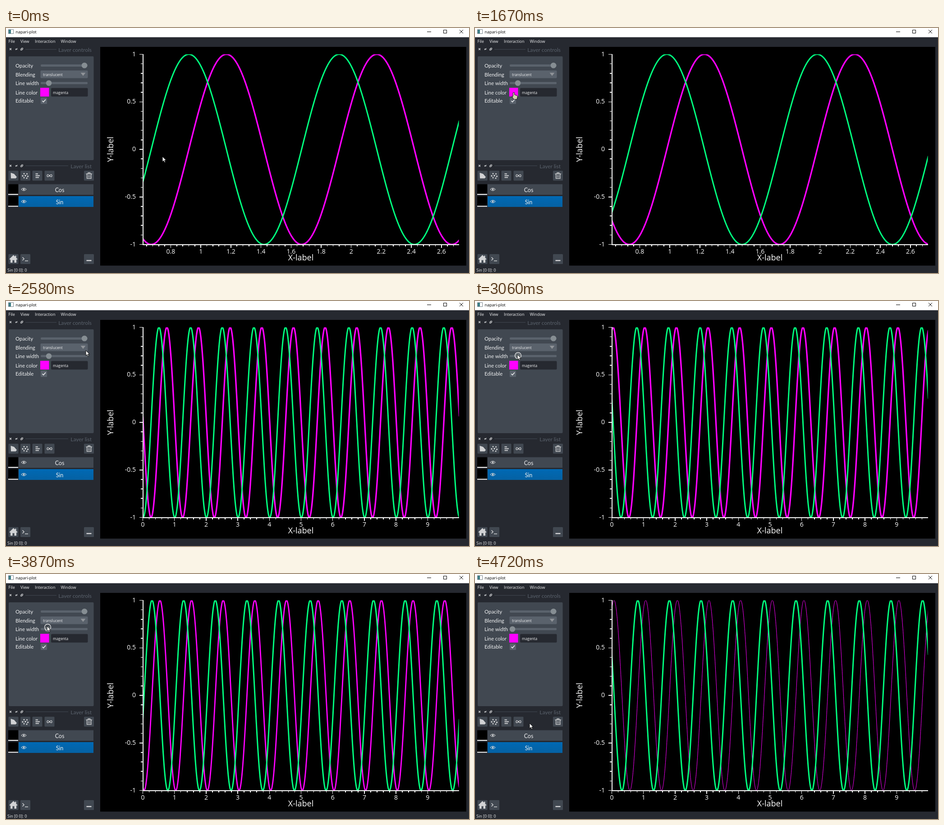
An HTML page that plays this animation: 1027x545 px, repeating every 4.82 s.

```html
<!DOCTYPE html>
<html lang="en">
<head>
<meta charset="utf-8">
<title>napari-plot</title>
<style>
  html, body { margin: 0; width: 100%; height: 100%; overflow: hidden; background: #262930; }
  svg { display: block; width: 1027px; height: 545px; font-family: "Open Sans", sans-serif; }
  .ui { font-size: 9px; fill: #f0f1f2; }
  .field { font-size: 8.3px; fill: #f0f1f2; }
  .label { font: 11.4px Lato, sans-serif; fill: #f0f1f2; }
  .layer { font: 12.5px Lato, sans-serif; fill: #f0f1f2; text-anchor: middle; }
  .dock { font: 12px Lato, sans-serif; fill: #5a626c; text-anchor: end; }
  .tick { font-size: 14px; fill: #fff; }
  .axis { font-size: 18px; fill: #fff; text-anchor: middle; }
  .panel { fill: #414851; }
  .groove { fill: #5a626c; }
  .knob { fill: #868e93; }
  .icon { fill: none; stroke: #d1d2d4; stroke-width: 1.3; }
  .solid { fill: #d1d2d4; }
  .line { fill: none; stroke-linejoin: round; }
  .ticks { stroke: #fff; shape-rendering: crispEdges; fill: none; }
</style>
</head>
<body>
<svg viewBox="0 0 1027 545">
  <defs>
    <clipPath id="plotClip"><rect x="304" y="58.5" width="700.5" height="423"/></clipPath>
    <clipPath id="titleClip"><rect x="100" y="38" width="95" height="15.4"/></clipPath>
    <g id="dockButtons">
      <path d="M8 -2L12 2M12 -2L8 2" stroke="#d1d2d4" stroke-width="1.2"/>
      <ellipse cx="23" rx="2.6" ry="1.5" fill="#9a9da1"/>
      <path d="M21 2L25.5 -2" stroke="#d1d2d4"/>
      <path d="M34.5 -2.5H37.5V.5H34.5ZM32.5 -.5H35.5V2.5H32.5Z" fill="none" stroke="#d1d2d4"/>
    </g>
    <rect id="button" class="panel" width="22" height="22" rx="1.5"/>
    <g id="eye">
      <path d="M-5.5 0Q0 -6 5.5 0Q0 6 -5.5 0Z" fill="none" stroke="#d1d2d4" stroke-width="1.1"/>
      <circle r="1.9" class="solid"/>
    </g>
    <g id="thumb">
      <rect x="5" width="22" height="23"/>
      <rect x="5" y="21.5" width="22" height="2" fill="#fff"/>
    </g>
    <linearGradient id="selected" x2="0" y2="1">
      <stop stop-color="#0069b4"/><stop offset="1" stop-color="#0561a3"/>
    </linearGradient>
  </defs>

  <rect width="1027" height="545" fill="#262930"/>
  <rect width="1027" height="20.5" fill="#fff"/>
  <rect x="5.5" y="3.5" width="11" height="9" fill="#fff" stroke="#78848c"/>
  <rect x="6" y="4" width="5" height="8" fill="#3e8087"/>
  <text x="21.5" y="11.5" class="ui" style="fill:#000">napari-plot</text>
  <path d="M934 8.5H943M970.5 4.5H977.5V11.5H970.5ZM1006 4L1014 12M1014 4L1006 12" fill="none" stroke="#000"/>
  <g class="ui">
    <text x="5.5" y="33">File</text><text x="32" y="33">View</text>
    <text x="64" y="33">Interaction</text><text x="121.5" y="33">Window</text>
    <text x="3" y="542">Sin [0 0]: 0</text>
  </g>

  <use href="#dockButtons" y="47"/>
  <path d="M43 47.5H112M43 306.5H138" stroke="#414851"/>
  <g clip-path="url(#titleClip)"><text x="190" y="52.5" class="dock">Layer controls</text></g>
  <rect class="panel" x="6" y="63" width="188.5" height="231" rx="2"/>
  <g class="label">
    <text x="21" y="88">Opacity</text><text x="21" y="107.5">Blending</text>
    <text x="21" y="127">Line width</text><text x="21" y="147.5">Line color</text>
    <text x="21" y="166">Editable</text>
  </g>
  <g class="groove">
    <rect x="77" y="81" width="104" height="5" rx="2"/>
    <rect x="76.500" y="94.500" width="105" height="17" rx="2"/>
    <rect x="77" y="120" width="104" height="5" rx="2"/>
    <rect x="77" y="155" width="14" height="14" rx="1.500"/>
  </g>
  <circle class="knob" cx="174" cy="83.300" r="6.300"/>
  <circle class="knob" id="knob" cx="95" cy="122.500" r="6.300"/>
  <path d="M165.500 99.500H176.500L171 106.500Z" fill="#909499"/>
  <text x="82" y="106.500" class="field">translucent</text>
  <rect x="76" y="133" width="19.500" height="19.500" fill="#f0f"/>
  <rect x="100" y="133.500" width="81.500" height="19" rx="2" fill="#262930"/>
  <text x="104" y="146.500" class="field">magenta</text>
  <path d="M80.500 162L83 164.500L88 159" fill="none" stroke="#f0f1f2" stroke-width="1.600"/>

  <use href="#dockButtons" y="306.500"/>
  <g clip-path="url(#titleClip)" transform="translate(0 259.500)"><text x="190" y="52.500" class="dock">Layer list</text></g>
  <use href="#button" x="5.500" y="317.500"/><use href="#button" x="32" y="317.500"/>
  <use href="#button" x="58.500" y="317.500"/><use href="#button" x="85.500" y="317.500"/>
  <use href="#button" x="173" y="317.500"/>
  <path class="solid" d="M10.500 322L18 324.500L24 331.500L21.500 334.500H11Z"/>
  <g class="solid">
    <circle cx="37" cy="329" r="1.700"/><circle cx="40" cy="324" r="1.600"/>
    <circle cx="43" cy="328.500" r="1.800"/><circle cx="46.500" cy="324.500" r="1.600"/>
    <circle cx="48.500" cy="330" r="1.700"/><circle cx="40" cy="333" r="1.600"/>
    <circle cx="46" cy="334" r="1.600"/>
  </g>
  <path class="icon" style="stroke-width:1.800" d="M65.500 324.500H71M65.500 328.500H75M65.500 332.500H73"/>
  <path class="icon" d="M96.500 328.500C93 324.500 91 326 91 328.500S93 332.500 96.500 328.500S102 326 102 328.500S100 332.500 96.500 328.500Z"/>
  <path class="icon" d="M177.500 324.500H191M182 324V322H186.500V324M179.500 325V334.500H189V325M182.500 327V332.500M186 327V332.500"/>

  <use href="#thumb" y="347.500"/>
  <rect class="panel" x="28" y="347.500" width="166" height="23.500"/>
  <use href="#eye" x="39.500" y="359"/><text x="119" y="364.500" class="layer">Cos</text>
  <use href="#thumb" y="374"/>
  <rect x="28" y="374" width="166" height="24" fill="url(#selected)"/>
  <use href="#eye" x="39.500" y="386"/><text x="119" y="391.500" class="layer">Sin</text>

  <use href="#button" x="5.500" y="503"/><use href="#button" x="32" y="503"/><use href="#button" x="173" y="503"/>
  <path class="solid" d="M7.500 514L16.500 505L20 508.500V506.500H22.500V511L25.500 514L24 515.500L23 514.500V522H18.500V516.500H14.500V522H10V514.500L9 515.500Z"/>
  <path class="icon" style="stroke-width:1.600" d="M36.500 510L40 513.500L36.500 517M42 518H49"/>
  <rect class="solid" x="178.500" y="516" width="11" height="2.500"/>

  <rect x="209" y="42" width="812" height="486.500"/>
  <g clip-path="url(#plotClip)">
    <path id="sin" class="line" stroke="#f0f"/>
    <path id="cos" class="line" stroke="#00ff7f" stroke-width="3"/>
  </g>
  <path class="ticks" d="M303.500 57.500V482.500M302.500 481.500H1005" stroke-width="2"/>
  <g id="yAxis"></g>
  <g id="xAxis"></g>
  <text x="654" y="517" class="axis">X-label</text>
  <text transform="translate(238 270) rotate(-90)" class="axis">Y-label</text>

  <circle id="ring" r="7" fill="#41485166" stroke="#e4e4e4" stroke-width="1.400"/>
  <g id="pointer" stroke="#000" stroke-width=".9">
    <path id="arrow" fill="#f4f4f4" d="M0 0V11.500L2.700 9L4.700 13.300L6.600 12.400L4.700 8.200H8.300Z"/>
    <path id="hand" fill="#cfcfae" d="M-1.700 1Q0 -1 1.700 1V5.500L7 7Q8.700 8 8.200 11L7 15.800H0L-3.600 10Q-4.500 7.500 -1.700 9Z"/>
  </g>
</svg>
<script>
const LOOP = 4820;
// moments at which the picture is refreshed
const TICKS = [0, 100, 215, 330, 445, 560, 680, 790, 900, 1000, 1110, 1210, 1320, 1430, 1550, 1670,
  1790, 1910, 2030, 2140, 2250, 2360, 2470, 2580, 2700, 2820, 2940, 3060, 3180, 3310, 3430,
  3550, 3660, 3770, 3870, 4000, 4110, 4230, 4350, 4480, 4600, 4720];

// tracks: [time, value...]
const PHASE = [[0, .92], [900, 1.48], [1670, 1.98], [2580, 2.51], [3430, 3.01], [3870, 3.29], [4720, 3.82]];
const KNOB = [[3060, 95], [3430, 109.5], [3550, 108], [3870, 92.5], [4000, 87], [4110, 83]];
const POINTER = [[0, 347, 286], [445, 420, 288], [900, 505, 293], [1000, 370, 245], [1110, 187, 185],
  [1210, 100, 155], [1320, 80, 145], [1670, 86, 143], [1790, 105, 150], [2030, 400, 235],
  [2140, 400, 235], [2360, 240, 140], [2580, 177, 110], [2820, 115, 117], [2940, 94, 119],
  [3060, 94, 119], [3430, 108, 118], [3550, 107, 118], [3870, 91, 116], [4000, 85, 117],
  [4110, 82, 118], [4350, 82, 119], [4600, 103, 250], [4720, 121, 332]];

const ZOOMED = { left: .6141, scale: 333.5, minor: .04 };
const FULL = { left: 0, scale: 70.2, minor: .2 };
const X0 = 303.5, X1 = 1004.5, Y0 = 270, AMP = 211.5;
const $ = id => document.getElementById(id);

function sample(track, t) {
  const next = track.findIndex(key => key[0] > t);
  if (next === 0) return track[0].slice(1);
  if (next < 0) return track[track.length - 1].slice(1);
  const a = track[next - 1], b = track[next], k = (t - a[0]) / (b[0] - a[0]);
  return a.slice(1).map((v, i) => v + (b[i + 1] - v) * k);
}

function curve(view, wave, phase) {
  let d = '';
  for (let x = X0; x <= X1 + 1; x += .5) {
    const value = wave(2 * Math.PI * (view.left + (x - X0) / view.scale - phase));
    d += (d ? 'L' : 'M') + x + ' ' + (Y0 - AMP * value).toFixed(2);
  }
  return d;
}

function axis(mark) {
  return `<path class="ticks" stroke-width="1.5" d="${mark.ticks}"/>${mark.labels}`;
}

function yAxis() {
  const mark = { ticks: '', labels: '' };
  for (let i = -10; i <= 10; i++) {
    const y = Y0 - i / 10 * AMP, major = i % 5 === 0;
    mark.ticks += `M${major ? 295.5 : 299} ${y}H303`;
    if (major) mark.labels += `<text class="tick" x="288" y="${y + 4}" text-anchor="end">${i / 10}</text>`;
  }
  return axis(mark);
}

function xAxis({ left, scale, minor }) {
  const mark = { ticks: '', labels: '' };
  const last = Math.floor((left + (X1 - X0) / scale) / minor);
  for (let i = Math.ceil(left / minor); i <= last; i++) {
    const x = X0 + (i * minor - left) * scale, major = i % 5 === 0;
    mark.ticks += `M${x} 482V${major ? 489 : 486}`;
    if (major) mark.labels += `<text class="tick" x="${x}" y="501.5" text-anchor="middle">${+(i * minor).toFixed(1)}</text>`;
  }
  return axis(mark);
}

const show = (el, on) => el.setAttribute('visibility', on ? 'visible' : 'hidden');
let shownView, shownTick;

function draw(t) {
  if (t === shownTick) return;
  shownTick = t;
  const view = t < 2030 ? ZOOMED : FULL;
  if (view !== shownView) $('xAxis').innerHTML = xAxis(shownView = view);

  const phase = Math.round(sample(PHASE, t)[0] * 100) / 100;
  const [knob] = sample(KNOB, t);
  const [x, y] = sample(POINTER, t);
  $('sin').setAttribute('d', curve(view, Math.sin, phase));
  $('sin').setAttribute('stroke-width', 1 + (knob - 83) * .19);
  $('cos').setAttribute('d', curve(view, Math.cos, phase));
  $('knob').setAttribute('cx', knob);

  $('pointer').setAttribute('transform', `translate(${x} ${y})`);
  $('ring').setAttribute('transform', `translate(${x + 1.5} ${y + 2.5})`);
  const overSwatch = t >= 1320 && t < 1790;
  show($('hand'), overSwatch);
  show($('arrow'), !overSwatch);
  show($('ring'), t >= 3060 && t < 4230);
}

function play() {
  const now = performance.now() % LOOP;
  draw(TICKS.filter(t => t <= now).pop());
  requestAnimationFrame(play);
}

$('yAxis').innerHTML = yAxis();
play();
</script>
</body>
</html>
```
